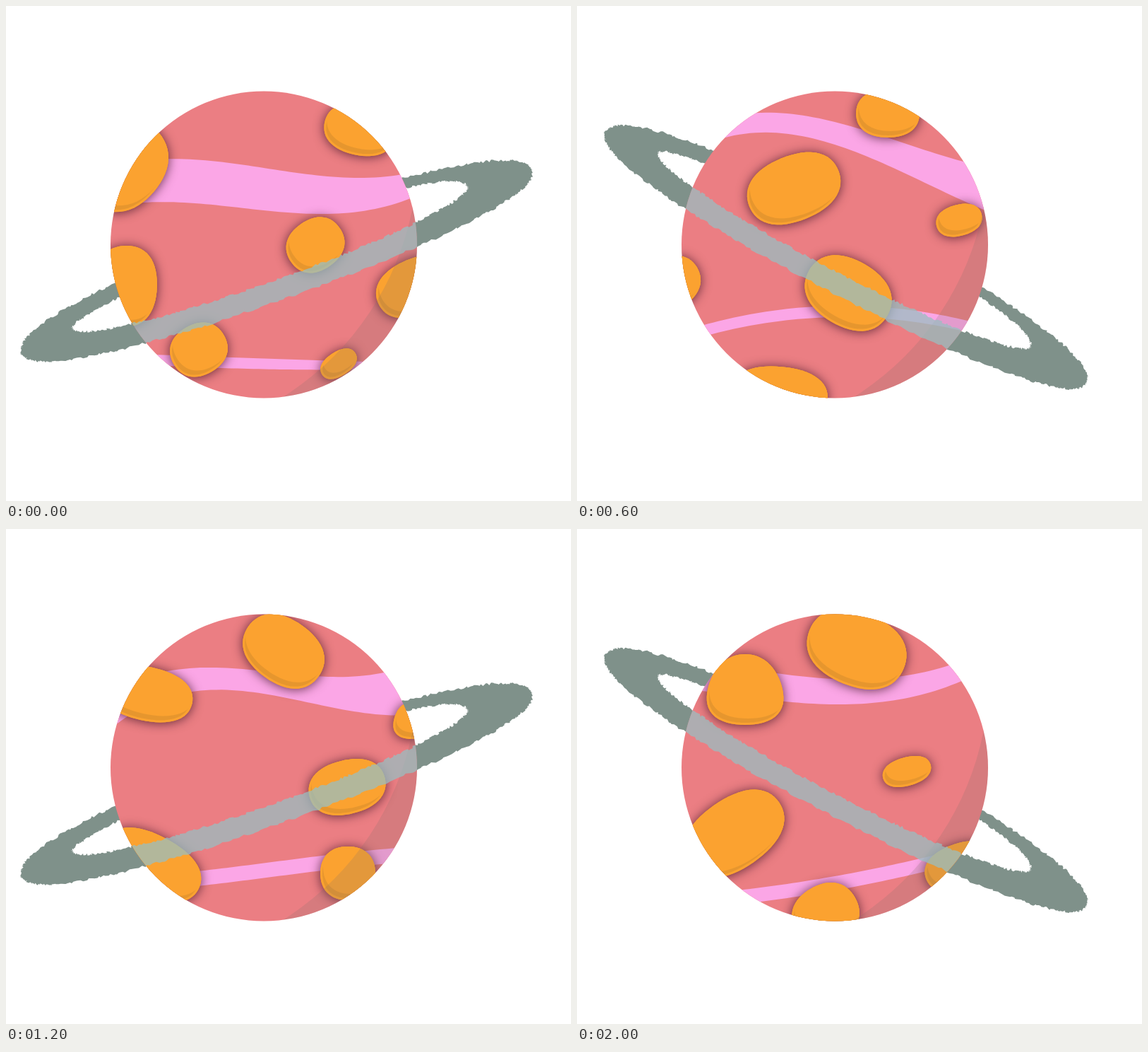
These frames come from a looping animation (800x700 px, 2200 ms). An HTML page with a canvas:

```html
<!DOCTYPE html>
<html lang="en">
<head>
<meta charset="utf-8">
<title>Ringed planet</title>
<style>
  html, body { margin: 0; width: 100%; height: 100%; overflow: hidden; background: #fff; }
  canvas { display: block; }
</style>
</head>
<body>
<canvas id="stage" width="800" height="700"></canvas>
<script>
const ctx = document.getElementById('stage').getContext('2d');
const STEP_MS = 200;
const PLANET = { x: 365, y: 337.5, r: 217 };
const HUB = { x: 388.6, y: 355.5 };
const CORAL = '#eb7e83', PINK = '#fba6e6', ORANGE = '#fba230', RING = '#7f918a';

// The surface scrolls left in steps while the ring rocks between four angles
const UP = -19.7, REST = -9.1, DOWN = 12.6, STEEP = 27.5;
const tilts = [UP, REST, DOWN, STEEP, DOWN, REST, UP, REST, REST, DOWN, STEEP];
const scrolls = [0, 155, 311, 459, 629, 811, 994, 1188, 1383, 1598, 1813];

const radians = degrees => degrees * Math.PI / 180;
const sample = (count, at) => Array.from({ length: count + 1 }, (_, i) => at(i / count));

function polygon(points, path = new Path2D()) {
  points.forEach(([x, y], i) => i ? path.lineTo(x, y) : path.moveTo(x, y));
  path.closePath();
  return path;
}

const between = (upper, lower) => polygon([...upper, ...[...lower].reverse()]);

// ---- Ring: half ovals with torn edges, relative to the hub ----
let seed = 7;
const random = () => (seed = seed * 16807 % 2147483647) / 2147483647;
const torn = () => (random() - .5) * 3.4;

function halfOval(cx, cy, rx, ry, power, lean = 0) {
  return sample(260, t => {
    const u = -Math.cos(Math.PI * t);
    const bulge = Math.max(0, 1 - Math.abs(u) ** power) ** (1 / power);
    return [cx + rx * u + torn(), cy + ry * (1 + lean * u) * bulge + torn()];
  });
}
const outerBack = halfOval(-7, 4, 384, -58, 2.2);
const outerFront = halfOval(-7, 4, 384, 53, 2.2);
const innerBack = halfOval(-14, -5, 297, -34, 2, .25);
const innerFront = halfOval(-14, -5, 297, 33, 2);

const ring = between(outerBack, outerFront);
ring.addPath(between(innerBack, innerFront));
const ringFront = between(innerFront, outerFront);

// ---- Craters: slightly boxy ovals, placed as they lie at the given step ----
const craters = [];
function crater(step, x, y, rx, ry, turn = 0, taper = 0) {
  const cos = Math.cos(radians(turn)), sin = Math.sin(radians(turn));
  craters.push(polygon(sample(60, t => {
    const a = 2 * Math.PI * t, swell = 1 + .04 * Math.sin(2 * a) ** 2;
    const px = rx * swell * Math.cos(a);
    const py = ry * swell * Math.sin(a) * (1 - taper * Math.cos(a));
    return [scrolls[step] + x + px * cos - py * sin, y + px * sin + py * cos];
  })));
}

crater(0, 163, 223, 69, 61, -50);
crater(0, 171, 396, 57, 43, 85, .1);
crater(0, 273, 486, 41, 36, -30);
crater(0, 438, 338, 42, 36, -35);
crater(0, 471, 506, 28, 17, -33);
crater(0, 501, 175, 51, 36, 12);
crater(2, 268, 397, 57, 39, -25);
crater(2, 455, 258, 68, 46, -22);
crater(3, 384, 406, 64, 47, 30);
crater(3, 286, 550, 69, 40, 5);
crater(3, 440, 152, 45, 34);
crater(3, 541, 303, 33, 22, -15);
crater(4, 564, 233, 66, 38, 12);
crater(4, 572, 475, 74, 42, 28);
crater(4, 409, 517, 41, 29, -25);
crater(6, 393, 173, 61, 45, 35);
crater(6, 483, 365, 55, 38, -14);
crater(6, 484, 487, 39, 38);
crater(8, 185, 271, 26, 25, -90, .2);
crater(8, 328, 165, 62, 42, 8);
crater(8, 482, 315, 34, 31);
crater(8, 420, 458, 58, 44, 45);
crater(8, 327, 550, 55, 43, 10);
crater(10, 396, 170, 72, 52, 22);
crater(10, 238, 227, 50, 53, -90, .2);
crater(10, 467, 343, 35, 20, -16);
crater(10, 222, 431, 78, 49, -35);
crater(10, 352, 545, 48, 42, -30);
crater(10, 542, 477, 51, 32, -20);

// ---- Pink bands: polynomials in u (-1 to 1 across) for the centre line and the thickness ----
const upperBand = {
  0: { line: [259, 29, -6, -34], width: [60, -11, -16] },
  2: { line: [203, -78, 25, 26], width: [43, -7, -11] },
  3: { line: [180, 64, 52, -34], width: [32, 16, 16] },
  4: { line: [257, 59, -50, -20], width: [56, 20, -10] },
  6: { line: [217, 30, 26, -50], width: [32, 12, 33] },
  8: { line: [193, -29, 4], width: [99, -44, -30] },
  10: { line: [230, 6, -39, -18], width: [36, -8, -2] }
};
const lowerBand = {
  0: { line: [506, 6, -3], width: [15, -3, -5] },
  2: { line: [475, -51, 9], width: [17] },
  3: { line: [432, -4, 35], width: [16] },
  4: { line: [461, 44, -3, -7], width: [19] },
  6: { line: [483, -29, -1, 6], width: [21] },
  8: { line: [472, 18, 4, -6], width: [24] },
  10: { line: [501, -40, -12], width: [20] }
};

const poly = (terms, u) => terms.reduceRight((sum, c) => sum * u + c, 0);

function bandPath(band, step) {
  // Steps without their own shape lie halfway between their neighbours
  const shapes = [band[step] || band[step - 1], band[step] || band[step + 1]];
  const mean = (key, u) => (poly(shapes[0][key], u) + poly(shapes[1][key], u)) / 2;
  const edge = side => sample(60, t => {
    const u = 2 * t - 1;
    return [PLANET.x + 225 * u, mean('line', u) + side * mean('width', u) / 2];
  });
  return between(edge(-1), edge(1));
}
const bands = scrolls.map((_, step) => [bandPath(upperBand, step), bandPath(lowerBand, step)]);

const globe = new Path2D();
globe.arc(PLANET.x, PLANET.y, PLANET.r, 0, 2 * Math.PI);

// Everything outside the lit disc
const shade = new Path2D();
shade.rect(-300, -300, 1200, 1200);
shade.arc(176, 208, 407, 0, 2 * Math.PI);

function fill(path, color, rule) {
  ctx.fillStyle = color;
  ctx.fill(path, rule);
}

function drawTilted(path, degrees, color, rule) {
  ctx.save();
  ctx.translate(HUB.x, HUB.y);
  ctx.rotate(radians(degrees));
  fill(path, color, rule);
  ctx.restore();
}

function drawCrater(body) {
  ctx.save();
  ctx.shadowColor = 'rgba(60, 20, 35, .8)';
  ctx.shadowBlur = 15;
  ctx.shadowOffsetY = 1;
  fill(body, ORANGE);
  ctx.shadowColor = 'transparent';
  // Dark crescent just inside the lower left rim
  ctx.clip(body);
  fill(body, 'rgba(205, 135, 45, .45)');
  ctx.strokeStyle = ORANGE;
  ctx.lineWidth = 6;
  ctx.stroke(body);
  ctx.translate(4, -9);
  fill(body, ORANGE);
  ctx.restore();
}

function draw() {
  const step = Math.floor(performance.now() / STEP_MS) % scrolls.length;
  ctx.clearRect(0, 0, 800, 700);
  drawTilted(ring, tilts[step], RING, 'evenodd');
  fill(globe, CORAL);

  ctx.save();
  ctx.clip(globe);
  bands[step].forEach(path => fill(path, PINK));
  ctx.save();
  ctx.translate(-scrolls[step], 0);
  craters.forEach(drawCrater);
  ctx.restore();
  fill(shade, 'rgba(130, 112, 105, .2)', 'evenodd');
  drawTilted(ringFront, tilts[step], 'rgba(153, 191, 193, .74)');
  ctx.restore();

  requestAnimationFrame(draw);
}
draw();
</script>
</body>
</html>
```
